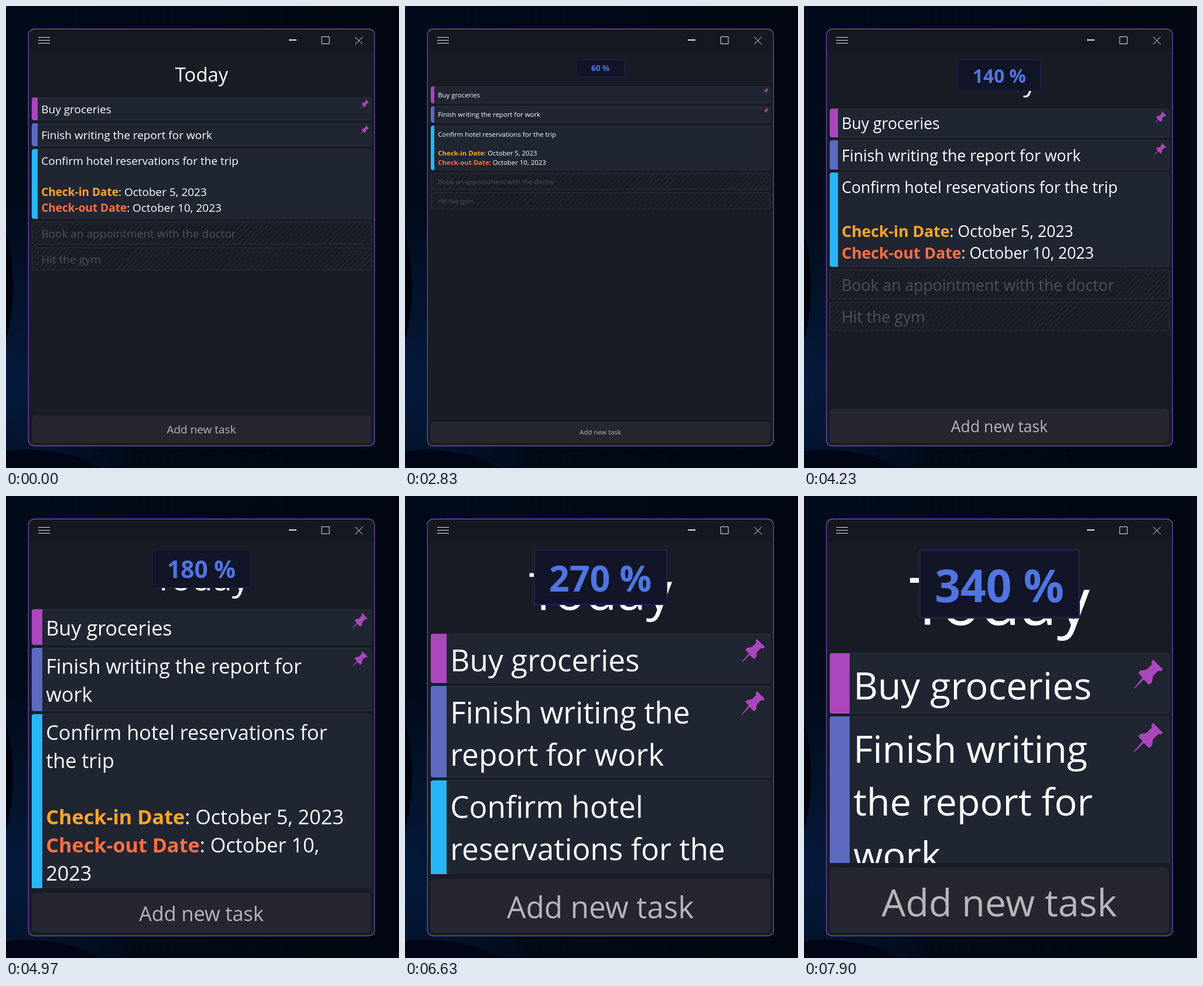
An HTML page that plays this animation: 671x788 px, repeating every 8 s.

```html
<!DOCTYPE html>
<html lang="en">
<head>
<meta charset="utf-8">
<title>Task list zoom</title>
<style>
  /* --u is one pixel at the current zoom */
  :root { --u: 1px; }
  * { box-sizing: border-box; margin: 0; }
  html, body { width: 100%; height: 100%; overflow: hidden; background: #010813; }
  body { position: relative; font-family: "Open Sans", "Noto Sans", sans-serif; color: #fff; }
  svg, #list, #add, #title, #badge, .bar, .pin { position: absolute; }
  #scene { left: 0; top: 0; }

  #list {
    left: 44px; top: 78px; width: 580px; overflow: hidden;
    height: calc(638.9px - 26.6 * var(--u));
    padding-top: calc(31.3px + 46.67 * var(--u));
  }
  #title {
    left: 0; top: 15px; width: 580px; text-align: center; font-weight: 400;
    font-size: calc(32.8 * var(--u)); line-height: calc(46.67 * var(--u));
  }
  #title span, .card p, #add span { position: relative; top: .045em; }

  /* The right padding keeps the text clear of the pin column */
  .card {
    position: relative; margin-bottom: 5px; border: 1px solid #2d313c; border-radius: 4px; background: #202532;
    padding: 5.2px calc(3px + 20 * var(--u)) 5.2px calc(5.2px + 10 * var(--u));
  }
  .card p, #add { font-size: calc(19 * var(--u)); line-height: calc(26.6 * var(--u)); }
  .bar { left: -1px; top: -1px; bottom: -1px; width: calc(10 * var(--u)); border-radius: 4px 0 0 4px; background: var(--c); }
  .pin {
    right: calc(1px + 2.6 * var(--u)); top: calc(.3px + 2.8 * var(--u));
    width: calc(14.7 * var(--u)); height: calc(14.7 * var(--u)); fill: #ab47bc;
  }
  .done {
    color: #4d5058;
    background: repeating-linear-gradient(135deg, #191c25 0 5.4px, #252831 5.4px 6.4px);
  }

  #badge {
    left: 289.5px; top: 13px; white-space: nowrap; font-weight: 700; color: #5075e2;
    padding: 4.85px 24.5px; border: var(--u) solid #19244f; border-radius: 4px; background: #121527;
    font-size: calc(22.6 * var(--u)); line-height: calc(30 * var(--u));
  }
  #badge span { position: relative; top: .025em; }
  #add {
    left: 44px; top: calc(724.6px - 26.6 * var(--u)); width: 579px; padding: 10px 0;
    border-radius: 6px; background: #25262f; color: #b6b7ba; text-align: center;
  }
</style>
</head>
<body>
<svg id="scene" width="671" height="788">
  <defs>
    <linearGradient id="night">
      <stop offset="0" stop-color="#020b1b"/><stop offset="1" stop-color="#010710"/>
    </linearGradient>
    <radialGradient id="glow" gradientUnits="userSpaceOnUse" cx="0" cy="0" r="1"
                    gradientTransform="translate(0 640) scale(240 300)">
      <stop offset="0" stop-color="#051a3c"/><stop offset="1" stop-color="#051a3c" stop-opacity="0"/>
    </radialGradient>
  </defs>
  <path fill="url(#night)" d="M0 0H671V788H0z"/>
  <path fill="url(#glow)" d="M0 0H671V788H0z"/>
  <ellipse cx="-60" cy="478" rx="72" ry="168" fill="#01030d"/>
  <ellipse cx="35" cy="830" rx="153" ry="73" fill="#020515"/>
  <rect x="38.5" y="39.5" width="590.5" height="710.5" rx="10" fill="#191c25"/>
  <path fill="#14181f" d="M38.5 78V49.5a10 10 0 0 1 10-10H619a10 10 0 0 1 10 10V78z"/>
  <rect x="38.25" y="39.25" width="591" height="711" rx="10" fill="none" stroke="#7149b4" stroke-width="1.3"/>
  <g fill="none" stroke="#e4e5e7">
    <path d="M55 53.5H75M55 58.5H75M55 63.5H75M539 52.5h13v12h-13zM596 52.5l13 13M609 52.5l-13 13"/>
    <path d="M483 58H496" stroke-width="2"/>
  </g>
  <symbol id="pin" viewBox="0 0 50 50">
    <path d="M33 0L50 17L46 20L42 19L33 28L31 39L26 43L17 34L2 49L0 50L1 48L15 31L8 23L11 19L22 17L31 8L30 4z"/>
  </symbol>
</svg>

<div id="list">
  <h1 id="title"><span>Today</span></h1>
  <div class="card" style="--c:#ab47bc"><i class="bar"></i><p>Buy groceries</p><svg class="pin"><use href="#pin"/></svg></div>
  <div class="card" style="--c:#5c6bc0"><i class="bar"></i><p>Finish writing the report for work</p><svg class="pin"><use href="#pin"/></svg></div>
  <div class="card" style="--c:#29b6f6"><i class="bar"></i><p>Confirm hotel reservations for the trip<br><br><b style="color:#ffa726">Check-in Date</b>: October 5, 2023<br><b style="color:#ff7043">Check-out Date</b>: October 10, 2023</p></div>
  <div class="card done"><p>Book an appointment with the doctor</p></div>
  <div class="card done"><p>Hit the gym</p></div>
  <div id="badge"><span></span></div>
</div>
<div id="add"><span>Add new task</span></div>

<script>
  const LOOP = 8000, BADGE_IN = 500, BADGE_MS = 700;
  // Each wheel notch changes the zoom by 10 %
  const zoomOut = [500, 770, 970, 1100, 1230, 1330, 1430];
  const zoomIn = [
    2500, 2670, 2830, 2970, 3170, 3370,
    3570, 3730, 3900, 4070, 4230, 4430, 4570,
    4770, 4970, 5170, 5330, 5500, 5700,
    5900, 6030, 6230, 6430, 6630, 6830,
    6970, 7170, 7370, 7500, 7630, 7900
  ];
  const badge = document.getElementById('badge');
  const label = badge.firstElementChild;
  const passed = (times, t) => times.filter(x => x <= t).length;

  function backOut(p) {
    const u = Math.min(p, 1) - 1;
    return 1 + 2.70158 * u ** 3 + 1.70158 * u ** 2;
  }

  function draw(t) {
    const zoom = 100 - 10 * passed(zoomOut, t) + 10 * passed(zoomIn, t);
    document.documentElement.style.setProperty('--u', zoom / 100 + 'px');
    label.textContent = zoom + ' %';
    const drop = 55 * (backOut((t - BADGE_IN) / BADGE_MS) - 1);
    badge.style.visibility = t < BADGE_IN ? 'hidden' : 'visible';
    badge.style.transform = `translate(-50%, ${drop}px)`;
  }

  const start = performance.now();
  function tick() {
    draw((performance.now() - start) % LOOP);
    requestAnimationFrame(tick);
  }
  tick();
</script>
</body>
</html>
```
